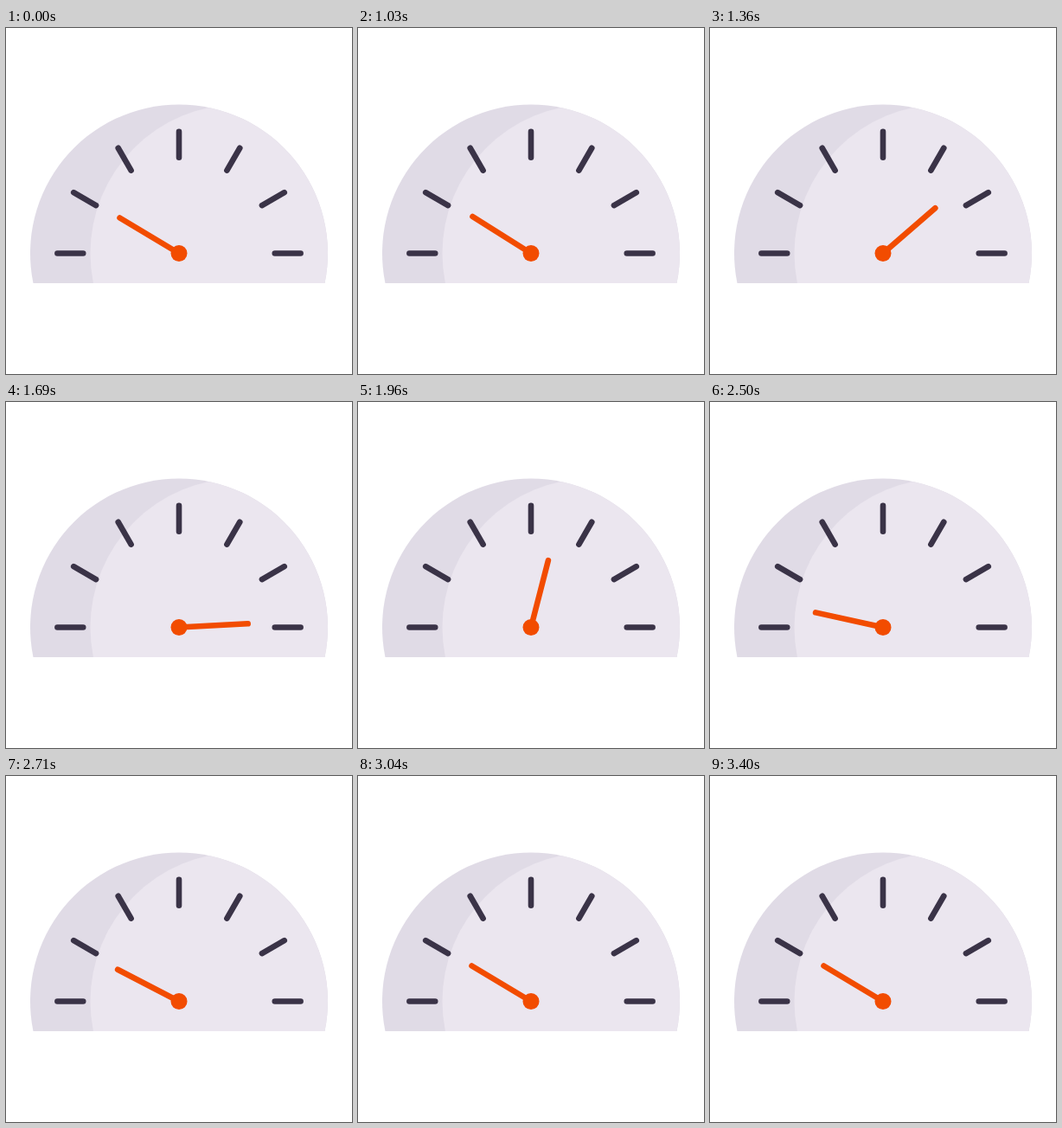
An HTML page that plays this animation: 400x400 px, repeating every 3430 ms.

```html
<!DOCTYPE html>
<html lang="en">
<head>
<meta charset="utf-8">
<title>Gauge</title>
<style>
  html, body { margin: 0; height: 100%; overflow: hidden; background: #fff; }
  svg { display: block; width: 100vw; height: 100vh; }
</style>
</head>
<body>
<svg viewBox="0 0 400 400">
  <defs>
    <clipPath id="dome"><path d="M31.5 295A172 172 0 1 1 368.5 295Z"/></clipPath>
  </defs>
  <g clip-path="url(#dome)">
    <rect width="400" height="400" fill="#e0dbe6"/>
    <circle cx="269.5" cy="260.5" r="172" fill="#ebe6ef"/>
  </g>
  <g transform="translate(200 260.5)" stroke-width="6.6" stroke-linecap="round">
    <g id="ticks" stroke="#3a3347"></g>
    <g id="needle" stroke="#f24c00"><path d="M0 0V-79.8"/></g>
    <circle r="9.5" fill="#f24c00"/>
  </g>
</svg>
<script>
  const LOOP = 3430, STEP = 30, REST = -59.1, PEAK = 87;

  // Each swing: start ms, end ms, start angle, end angle
  const swings = [
    [1000, 1540, REST, PEAK],
    [1696, 2290, PEAK, -PEAK],
    [2290, 2830, -PEAK, REST],
  ];

  const ease = s => s * s * (3 - 2 * s);

  function angleAt(time) {
    let angle = REST;
    for (const [start, end, from, to] of swings) {
      if (time < start) break;
      angle = from + (to - from) * ease(Math.min(1, (time - start) / (end - start)));
    }
    return angle;
  }

  const ticks = document.getElementById('ticks');
  for (let a = -90; a <= 90; a += 30) {
    ticks.innerHTML += `<path d="M0 -110.8V-140.6" transform="rotate(${a})"/>`;
  }

  const needle = document.getElementById('needle');
  function draw() {
    const time = Math.floor((performance.now() % LOOP) / STEP) * STEP;
    // Steps fall on 1030, 1060, ... after the opening rest
    const stepped = time < 1020 ? 0 : Math.floor((performance.now() % LOOP - 1000) / STEP) * STEP + 1000;
    needle.setAttribute('transform', `rotate(${angleAt(stepped)})`);
    requestAnimationFrame(draw);
  }
  draw();
</script>
</body>
</html>
```
